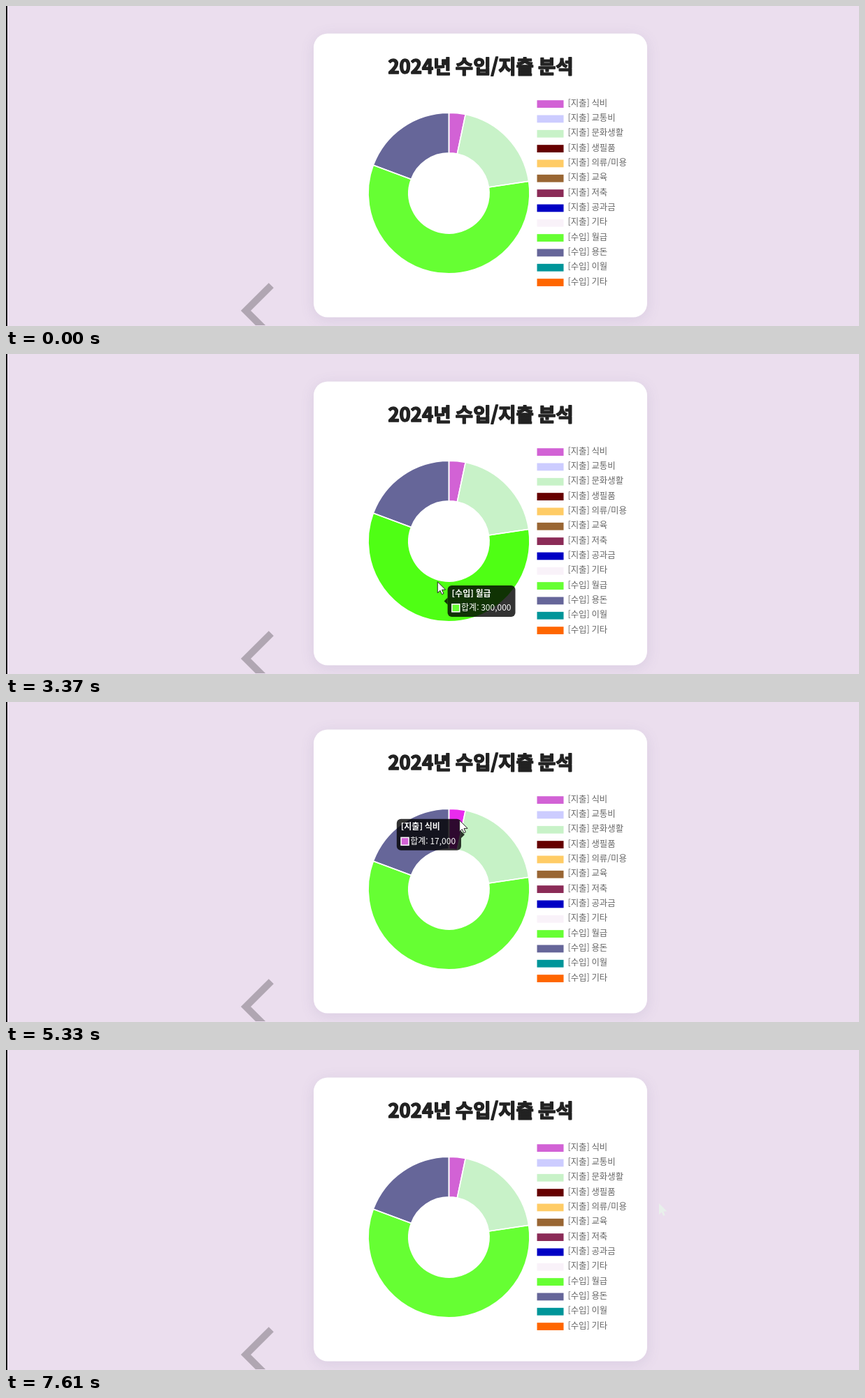
An HTML page with a canvas that plays this animation: 1220 px wide and 459 px high, repeating every 8 s.

```html
<!DOCTYPE html>
<html lang="ko">
<head>
<meta charset="utf-8">
<title>수입/지출 분석</title>
<style>
html, body { margin: 0; width: 100%; height: 100%; overflow: hidden; background: #ebdeee; }
canvas { display: block; }
</style>
</head>
<body>
<canvas id="stage" width="1220" height="459"></canvas>
<script>
const ctx = document.getElementById('stage').getContext('2d');
const LOOP = 8000;
const HOVER_LAG = 60;
const FONT = '"Noto Sans CJK KR", "Noto Sans CJK JP", "Noto Sans CJK", sans-serif';
const CX = 633.5, CY = 268.5, OUTER = 115.4, INNER = 57.6;
const TIP_HEIGHT = 45;

const legend = [
  { label: '[지출] 식비', color: '#d262d5', value: 17000 },
  { label: '[지출] 교통비', color: '#ccccff' },
  { label: '[지출] 문화생활', color: '#c8f2c8', value: 100000 },
  { label: '[지출] 생필품', color: '#660000' },
  { label: '[지출] 의류/미용', color: '#ffcc66' },
  { label: '[지출] 교육', color: '#996633' },
  { label: '[지출] 저축', color: '#8b2b57' },
  { label: '[지출] 공과금', color: '#0000c4' },
  { label: '[지출] 기타', color: '#f9f2f9' },
  { label: '[수입] 월급', color: '#66ff33', value: 300000 },
  { label: '[수입] 용돈', color: '#666699', value: 100000 },
  { label: '[수입] 이월', color: '#009599' },
  { label: '[수입] 기타', color: '#ff6600' },
];

// Pointer stops: [time, x, y]
const stops = [
  [810, 1102, 456], [1200, 850, 369], [1600, 767, 370], [1930, 767, 370],
  [2340, 740, 362], [2520, 617, 327], [3370, 617, 327], [3700, 691, 230],
  [4170, 706, 203], [4670, 706, 203], [5170, 653, 172], [5470, 645, 168],
  [6100, 645, 168], [6530, 586, 188], [7140, 586, 188], [7440, 934, 220], [7590, 1184, 242],
];
const ghost = stops[stops.length - 2];

const clamp = v => Math.max(0, Math.min(1, v));
const mix = (a, b, k) => a + (b - a) * k;
const easeOutQuart = p => 1 - (1 - clamp(p)) ** 4;
const parseHex = hex => [1, 3, 5].map(i => parseInt(hex.slice(i, i + 2), 16));

// Half again as saturated and a tenth darker, in HSL terms.
function hoverColor(rgb) {
  const max = Math.max(...rgb) / 255, min = Math.min(...rgb) / 255;
  const chromaLimit = l => 1 - Math.abs(2 * l - 1);
  const light = (max + min) / 2, darker = light * 0.9;
  const saturation = Math.min(1, 1.5 * (max - min) / chromaLimit(light));
  const gain = chromaLimit(darker) * saturation / (max - min);
  return rgb.map(c => 255 * (darker + (c / 255 - light) * gain));
}

function makeSlices() {
  const slices = legend.filter(entry => entry.value);
  const total = slices.reduce((sum, s) => sum + s.value, 0);
  let angle = -Math.PI / 2;
  ctx.font = `12px ${FONT}`;
  return slices.map(({ label, color, value }) => {
    const start = angle, end = angle += value / total * 2 * Math.PI;
    const mid = (start + end) / 2, radius = (OUTER + INNER) / 2;
    const anchorX = CX + radius * Math.cos(mid);
    const body = `합계: ${value.toLocaleString('en-US')}`;
    const width = ctx.measureText(body).width + 25.5;
    const onRight = anchorX <= CX;
    const rgb = parseHex(color);
    return {
      label, color, body, start, end, onRight, width, rgb, hover: hoverColor(rgb),
      x: onRight ? anchorX + 7 : anchorX - 7 - width,
      y: CY + radius * Math.sin(mid) - TIP_HEIGHT / 2,
    };
  });
}

function pointerAt(t) {
  const next = stops.findIndex(s => s[0] > t);
  if (next < 1) return null;
  const [t0, x0, y0] = stops[next - 1], [t1, x1, y1] = stops[next];
  const k = (t - t0) / (t1 - t0);
  return [mix(x0, x1, k), mix(y0, y1, k)];
}

function sliceAt(point) {
  if (!point) return null;
  const dx = point[0] - CX, dy = point[1] - CY, radius = Math.hypot(dx, dy);
  if (radius < INNER || radius > OUTER) return null;
  const turn = (Math.atan2(dy, dx) + 2.5 * Math.PI) % (2 * Math.PI) - Math.PI / 2;
  return slices.find(s => turn >= s.start && turn < s.end) || null;
}

// Every change of the hovered slice; the tooltip keeps showing the last one.
function findHovers() {
  const hovers = [{ time: 0, slice: null, shown: null }];
  for (let t = 0; t < LOOP; t += 4) {
    const last = hovers[hovers.length - 1], slice = sliceAt(pointerAt(t));
    if (slice !== last.slice) hovers.push({ time: t + HOVER_LAG, slice, shown: slice || last.shown });
  }
  hovers[0].shown = hovers[1].shown;
  return hovers;
}

const slices = makeSlices();
const hovers = findHovers();

// A value that eases to a new goal at each change of hover.
function follow(t, goal, duration, ease) {
  let value = goal(hovers[0]);
  hovers.forEach((hover, i) => {
    if (hover.time > t) return;
    const until = i + 1 < hovers.length ? Math.min(t, hovers[i + 1].time) : t;
    value = mix(value, goal(hover), ease((until - hover.time) / duration));
  });
  return value;
}

function text(str, x, y, size, color, weight = 400) {
  ctx.font = `${weight} ${size}px ${FONT}`;
  ctx.fillStyle = color;
  ctx.fillText(str, x, y);
}

function box(x, y, w, h, radius) {
  ctx.beginPath();
  ctx.roundRect(x, y, w, h, radius);
  ctx.fill();
}

function polygon(points) {
  ctx.beginPath();
  points.forEach(([x, y]) => ctx.lineTo(x, y));
  ctx.closePath();
}

function drawPage() {
  ctx.fillStyle = '#ebdeee';
  ctx.fillRect(0, 0, 1220, 459);
  ctx.fillStyle = '#000';
  ctx.fillRect(0, 0, 1.8, 459);

  ctx.strokeStyle = '#b0a6b2';
  ctx.lineWidth = 10;
  ctx.beginPath();
  ctx.moveTo(379.3, 400.7);
  ctx.lineTo(343, 437);
  ctx.lineTo(370, 464);
  ctx.stroke();
  ctx.fillStyle = '#ebdeee';
  ctx.fillRect(330, 458, 60, 1);

  ctx.save();
  ctx.shadowColor = 'rgba(100, 90, 150, 0.13)';
  ctx.shadowBlur = 20;
  ctx.shadowOffsetY = 4;
  ctx.fillStyle = '#fff';
  box(440, 39.5, 477, 407, 20);
  ctx.restore();

  const title = '2024년 수입/지출 분석';
  ctx.save();
  ctx.textAlign = 'center';
  text(title, 679, 97, 27.5, '#222', 900);
  ctx.strokeStyle = '#222';
  ctx.lineWidth = 1.6;
  ctx.lineJoin = 'round';
  ctx.strokeText(title, 679, 97);
  ctx.restore();

  legend.forEach(({ label, color }, i) => {
    const y = i * 21.33;
    ctx.fillStyle = color;
    ctx.fillRect(759.5, 135.2 + y, 38, 10.8);
    text(label, 803.5, 143.6 + y, 12.4, '#666');
  });
}

function slicePath({ start, end }) {
  ctx.beginPath();
  ctx.arc(CX, CY, OUTER, start, end);
  ctx.arc(CX, CY, INNER, end, start, true);
  ctx.closePath();
}

function drawDoughnut(t) {
  for (const s of slices) {
    const heat = follow(t, h => h.slice === s ? 1 : 0, 200, easeOutQuart);
    ctx.fillStyle = `rgb(${s.rgb.map((c, i) => Math.round(mix(c, s.hover[i], heat)))})`;
    slicePath(s);
    ctx.fill();
  }
  ctx.strokeStyle = '#fff';
  ctx.lineWidth = 1.6;
  for (const s of slices) {
    slicePath(s);
    ctx.stroke();
  }
}

function drawTooltip(t) {
  const alpha = follow(t, h => h.slice ? 1 : 0, 200, clamp);
  if (!alpha) return;
  const { shown } = hovers.findLast(h => h.time <= t);
  const [x, y, w] = ['x', 'y', 'width'].map(key => follow(t, h => h.shown[key], 400, easeOutQuart));
  const edge = shown.onRight ? x : x + w;
  const tip = shown.onRight ? x - 5 : x + w + 5;
  const middle = y + TIP_HEIGHT / 2;

  ctx.save();
  ctx.globalAlpha = alpha;
  ctx.fillStyle = 'rgba(0, 0, 0, 0.8)';
  box(x, y, w, TIP_HEIGHT, 6);
  polygon([[edge, middle - 5], [tip, middle], [edge, middle + 5]]);
  ctx.fill();
  text(shown.label, x + 6, y + 15.7, 12, '#fff', 700);
  ctx.fillRect(x + 5.5, y + 26, 12.5, 12.5);
  ctx.fillStyle = shown.color;
  ctx.fillRect(x + 7, y + 27.5, 9.5, 9.5);
  text(shown.body, x + 19.5, y + 36, 12, '#fff', 500);
  ctx.restore();
}

function pointerShape(x, y) {
  polygon([[0, 0], [0, 16], [3.7, 12.6], [6.2, 18], [8.7, 16.9], [6.3, 11.6], [11.4, 11.4]]
    .map(([dx, dy]) => [x + dx, y + dy]));
}

function drawPointer(t) {
  const [ghostTime, ghostX, ghostY] = ghost;
  if (t >= ghostTime) {
    ctx.fillStyle = 'rgba(232, 243, 234, 0.85)';
    pointerShape(ghostX, ghostY);
    ctx.fill();
  }
  const point = pointerAt(t);
  if (!point) return;
  pointerShape(...point);
  ctx.fillStyle = '#fff';
  ctx.fill();
  ctx.strokeStyle = '#222';
  ctx.lineWidth = 1;
  ctx.stroke();
}

const startTime = performance.now();
function tick() {
  const t = (performance.now() - startTime) % LOOP;
  drawPage();
  drawDoughnut(t);
  drawTooltip(t);
  drawPointer(t);
  requestAnimationFrame(tick);
}
tick();
</script>
</body>
</html>
```
